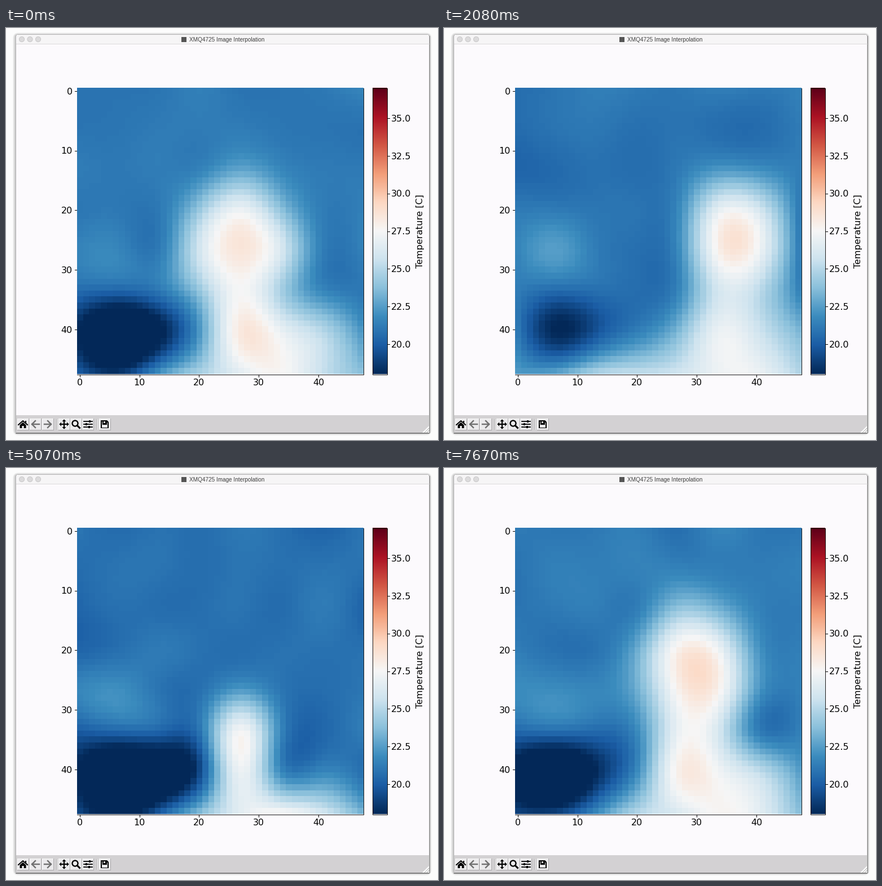
A matplotlib script that plays this animation: 766 by 731 pixels, repeating every 7930 ms.

```python
import numpy as np
import matplotlib.pyplot as plt
from matplotlib.animation import FuncAnimation
from matplotlib.colors import ListedColormap
from matplotlib.patches import Circle, FancyBboxPatch, Polygon, Rectangle

W, H, DPI = 766, 731, 64
PT = 72 / DPI  # points per pixel
FRAMES, INTERVAL = 61, 130
SENSORS, PIXELS = 8, 48
T_MIN, T_MAX = 18, 37
LEFT, RIGHT, TOP, BOTTOM = 125.5, 633.5, 106.5, 614.5
CELL = (RIGHT - LEFT) / PIXELS
BAR_LEFT, BAR_RIGHT = 649.5, 675.5

# Path of the visitor's head and of the cold object; the rest follows from these.
KEY_TIMES = [0, 9, 24, 31, 39, 52, 59]
HEAD_X = [27, 34.5, 39, 38.3, 27, 26.5, 29.5]
HEAD_Y = [27, 25.5, 25, 25.5, 36, 22.5, 24]
HEAD_SIZE = [7.7, 6.4, 7.3, 7.3, 4.7, 10.1, 7.6]
COLD_X = [7, 3.5, 14, 14.5, 8.5, 4.5, 5.5]
COLD_SIZE = [8, 3.5, 5, 5.5, 9, 6, 8]

# The shades are a little deeper than the stock colour map.
SHADES = ListedColormap(plt.get_cmap("RdBu_r")(np.linspace(0, 1, 256))[:, :3] ** 1.1)


def spline_matrix():
    """Natural cubic spline weights from the sensors to the pixels."""
    knots = np.linspace(0, PIXELS - 1, SENSORS)

    def basis(x):
        cubes = np.abs(x[:, None] - knots) ** 3
        return np.column_stack([cubes, np.ones_like(x), x])

    system = np.zeros((SENSORS + 2, SENSORS + 2))
    system[:SENSORS] = basis(knots)
    system[SENSORS:, :SENSORS] = system[:SENSORS, SENSORS:].T
    return basis(np.arange(PIXELS, dtype=float)) @ np.linalg.inv(system)[:, :SENSORS]


SPLINE = spline_matrix()
GX, GY = np.meshgrid(*[np.linspace(0, PIXELS - 1, SENSORS)] * 2)


def track(values, frame):
    """Ease smoothly from one key value to the next."""
    pos = np.interp(frame, KEY_TIMES, range(len(KEY_TIMES)))
    i = min(int(pos), len(KEY_TIMES) - 2)
    u = pos - i
    return values[i] + (values[i + 1] - values[i]) * u * u * (3 - 2 * u)


def blob(x, y, rx, ry, degrees, power=3):
    """Soft ellipse that falls to half its heat at the given radii."""
    return degrees * 0.5 ** (np.hypot((GX - x) / rx, (GY - y) / ry) ** power)


def pulse(frame, peak, width):
    return np.exp(-((frame - peak) / width) ** 2)


def visitor(frame, cold_size):
    x, y, size = (track(v, frame) for v in (HEAD_X, HEAD_Y, HEAD_SIZE))
    heat = 5 + 0.33 * size
    crouch = max(0, y - 27)
    parts = [
        blob(x, y, size, 3.5 + 0.85 * size, heat),
        blob(x, 38, 3 + 0.35 * size, 8, heat),
        blob(21 + 0.42 * x, 44 + 0.4 * crouch, 12, 5, heat),
        blob(30, 48, 33 - 1.9 * cold_size, 4, 5),
    ]
    return sum(part ** 10 for part in parts) ** 0.1


def temperature(frame):
    frame = min(frame, KEY_TIMES[-1])
    cold_x, cold_size = track(COLD_X, frame), track(COLD_SIZE, frame)
    wave, linger = pulse(frame, 9, 5), pulse(frame, 28, 7)

    grid = 20.9 + 0.25 * np.cos(2 * np.pi * frame / FRAMES)
    grid = grid + visitor(frame, cold_size)
    grid += blob(4 + 10.5 * wave - 2 * linger, 27 + 7 * wave + 7 * linger,
                 5, 4 + 3 * wave + 6 * linger, 1 + 2.8 * wave + 1.9 * linger)
    grid -= blob(cold_x, 38 + cold_size / 2, cold_size, 5, 0.8 * cold_size, power=2)
    grid += np.random.default_rng(frame + 40).normal(0, 0.25, GX.shape)
    return SPLINE @ grid @ SPLINE.T


fig = plt.figure(figsize=(W / DPI, H / DPI), dpi=DPI, facecolor="#fcfcfc")
ax = fig.add_axes([0, 0, 1, 1])


def line(xs, ys, color="black", width=1.0, **style):
    ax.plot(xs, ys, color=color, lw=width * PT, **style)


def rect(x, y, w, h, color, **style):
    ax.add_patch(Rectangle((x, y), w, h, fc=color, lw=0, **style))


def shape(points, color):
    ax.add_patch(Polygon(points, fc=color, lw=0, zorder=4))


def text(x, y, label, size=16, **style):
    ax.text(x, y, label, fontsize=size * PT,
            **{"family": "DejaVu Sans", "va": "baseline", **style})


def draw_window():
    for grow in range(7, 0, -1):
        ax.add_patch(FancyBboxPatch(
            (17, 13), 733, 705, fc="black", lw=0, alpha=0.03,
            boxstyle=f"round,pad={grow * 0.7},rounding_size={3 + grow}"))
    ax.add_patch(FancyBboxPatch((17.5, 11.5), 733, 707, fc="#fcfafd", ec="#b4b4b4",
                                lw=PT, boxstyle="round,pad=0,rounding_size=4"))
    rect(19, 12, 730, 15.5, "#f6f5f6")
    line([18, 750], [27.5, 27.5], "#dcdadc")
    for x in (28, 42.5, 57):
        ax.add_patch(Circle((x, 20), 4.6, fc="#dcdbdc", ec="#c4c3c4", lw=0.8 * PT))
    rect(310.5, 15.5, 9, 9, "#555555")
    text(325, 23.6, "XMQ4725 Image Interpolation", 10, family="Liberation Sans",
         color="#404040")
    rect(18, 687, 732, 31, "#d3d1d3")
    line([18, 750], [718.5, 718.5], "#6a6a6a", 1.5)
    line([750.5, 750.5], [14, 718], "#8c8c8c")
    shape([(738, 718), (750, 706), (750, 718)], "white")
    for d in (4, 8):
        line([750 - d, 750], [718, 718 - d], "#a0a0a0", 0.8, zorder=5)


def draw_button(x):
    rect(x - 10, 693, 20, 20, "#ebeaec")
    line([x - 10, x - 10, x + 10], [713, 693, 693], "#fafafa")
    line([x - 10, x + 10, x + 10], [713, 713, 693], "#aaa8aa")


def draw_arrow(x, side):
    gray = "#707070"
    line([x - 6.5 * side, x + 6 * side], [703, 703], gray, 2.4)
    line([x, x + 6 * side, x], [697, 703, 709], gray, 2.4)


def draw_toolbar():
    y = 703
    for x in (30, 52, 74, 103, 124, 145, 175):
        draw_button(x)
    for x in (89, 160):
        line([x, x], [694, 712], "#b0aeb0")
        line([x + 1, x + 1], [694, 712], "#eeeeee")

    # home
    line([22, 30, 38], [704, 697, 704], width=2)
    shape([(24.5, 704.5), (30, 699.5), (35.5, 704.5), (35.5, 710), (31.7, 710),
           (31.7, 706), (28.3, 706), (28.3, 710), (24.5, 710)], "black")
    rect(34, 697, 2.2, 5, "black", zorder=4)

    draw_arrow(52, -1)
    draw_arrow(74, 1)

    # pan
    line([96, 110], [y, y], width=2.2)
    line([103, 103], [y - 7, y + 7], width=2.2)
    for dx, dy in ((1, 0), (-1, 0), (0, 1), (0, -1)):
        bx, by = 103 + 5 * dx, y + 5 * dy
        shape([(103 + 8.5 * dx, y + 8.5 * dy), (bx + 3.6 * dy, by + 3.6 * dx),
               (bx - 3.6 * dy, by - 3.6 * dx)], "black")

    # zoom
    ax.add_patch(Circle((122.5, 701.5), 5, fc="none", ec="black", lw=2.3 * PT, zorder=4))
    line([126.5, 130.5], [705.5, 709.5], width=3)

    # sliders
    for dy, knob in ((-5, 148), (0, 142), (5, 147)):
        line([138, 153], [y + dy, y + dy], width=1.8)
        rect(knob - 1.5, y + dy - 2, 3, 4, "black", zorder=4)

    # save
    shape([(168, 696), (179, 696), (182, 699), (182, 710), (168, 710)], "black")
    for x, top, w, h in ((169.7, 697.6, 1.6, 11), (172.8, 697.6, 3.2, 3.2),
                         (171.3, 704, 7.4, 4.6), (178.7, 700, 1.7, 8.6)):
        rect(x, top, w, h, "#ebeaec", zorder=5)


def draw_axes():
    line([LEFT, RIGHT, RIGHT], [BOTTOM, BOTTOM, TOP], width=0.9, zorder=3)
    ax.add_patch(Rectangle((BAR_LEFT, TOP), BAR_RIGHT - BAR_LEFT, BOTTOM - TOP,
                           fc="none", ec="black", lw=0.9 * PT, zorder=3))
    for value in range(0, PIXELS, 10):
        offset = (value + 0.5) * CELL
        line([LEFT + offset] * 2, [BOTTOM, BOTTOM + 4])
        line([LEFT - 4, LEFT], [TOP + offset] * 2)
        text(LEFT + offset, 634, str(value), ha="center")
        text(118, TOP + offset + 5.8, str(value), ha="right")
    for value in np.arange(20, 36, 2.5):
        y = BOTTOM - (value - T_MIN) / (T_MAX - T_MIN) * (BOTTOM - TOP)
        line([BAR_RIGHT, BAR_RIGHT + 4], [y, y])
        text(683, y + 5.8, f"{value:.1f}")
    text(735, (TOP + BOTTOM) / 2, "Temperature [C]", rotation=90,
         ha="center", va="center")


def show(values, left, right):
    return ax.imshow(values, cmap=SHADES, vmin=T_MIN, vmax=T_MAX, aspect="auto",
                     extent=(left, right, BOTTOM, TOP), interpolation="nearest",
                     zorder=2)


draw_window()
draw_toolbar()
draw_axes()
show(np.linspace(T_MAX, T_MIN, 256)[:, None], BAR_LEFT, BAR_RIGHT)
heat_map = show(temperature(0), LEFT, RIGHT)
ax.set(xlim=(0, W), ylim=(H, 0))
ax.axis("off")


def update(frame):
    heat_map.set_data(temperature(frame))
    return [heat_map]


animation = FuncAnimation(fig, update, frames=FRAMES, interval=INTERVAL,
                          repeat=True, repeat_delay=0)
plt.show()
```
